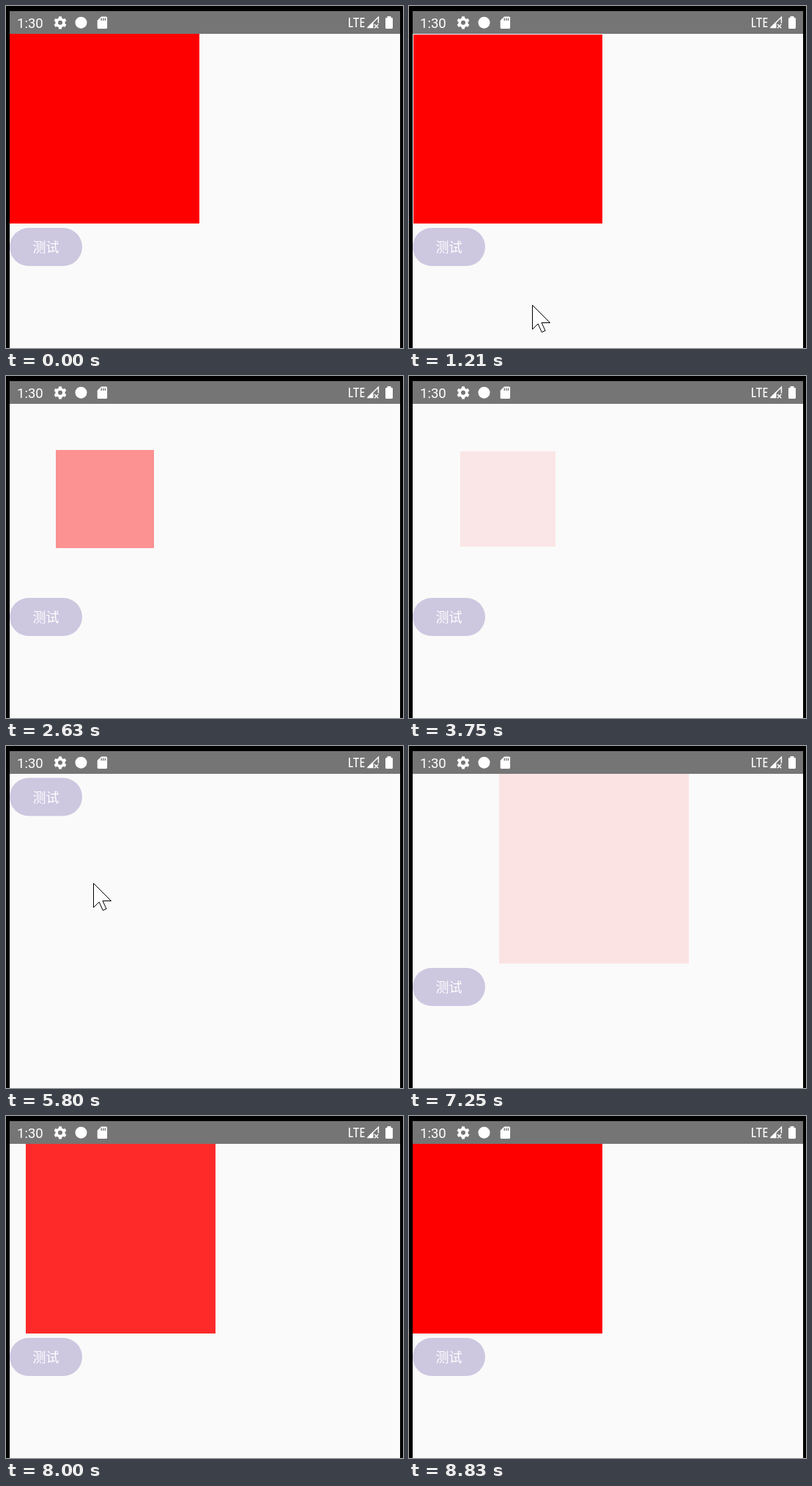
An HTML page for the animation above (9840 ms loop, 542 px wide and 467 px high).

```html
<!DOCTYPE html>
<html lang="zh-CN">
<head>
<meta charset="utf-8">
<title>Visibility animation</title>
<style>
  html, body { margin: 0; width: 100%; height: 100%; overflow: hidden; background: #000; }
  svg { display: block; width: 542px; height: 467px; }
  .clock { font: 18.5px Roboto, sans-serif; fill: #fff; }
  .label { font: 18px "Noto Sans CJK SC", "Noto Sans CJK", sans-serif; fill: #fff; text-anchor: middle; }
</style>
</head>
<body>
<svg viewBox="0 0 542 467">
  <rect width="542" height="467" fill="#000"/>
  <rect x="5" y="7" width="533" height="460" fill="#fafafa"/>
  <rect id="square" fill="#f00" shape-rendering="crispEdges"/>
  <g id="button">
    <rect x="5" y="303" width="99" height="52" rx="26" fill="#cdc7e0"/>
    <text class="label" x="54.5" y="336">测试</text>
  </g>

  <rect x="5" y="7" width="533" height="31" fill="#757575"/>
  <text class="clock" x="15" y="29.5">1:30</text>
  <g id="gear" transform="translate(74 22.8)" fill="#fff">
    <circle r="4.8" fill="none" stroke="#fff" stroke-width="3.6"/>
  </g>
  <circle cx="102.5" cy="22.7" r="8" fill="#fff"/>
  <path d="M130 14.5h6.5q1.6 0 1.6 1.6v13.3q0 1.6-1.6 1.6h-10.200q-1.600 0-1.600-1.600v-9.600z" fill="#fff"/>
  <path d="M130.300 16.500v3.500M132.900 16.500v3.500M135.500 16.500v3.500" stroke="#757575" stroke-width="1.400"/>
  <path d="M468.800 16v12.200h5M474 16.800h8M478 16.800v12.200M489.500 16.800h-5v11.400h5M484.500 22.300h4.400"
        fill="none" stroke="#fff" stroke-width="1.600"/>
  <path d="M492.500 30.300L501.500 21.300V30.300z" fill="#fff"/>
  <path d="M494 29.300L508.400 15.300V23.500M503 25l5.200 5.200M508.200 25l-5.200 5.200"
        fill="none" stroke="#fff" stroke-width="1.500"/>
  <path d="M520.500 14h5v2h1.200q1.300 0 1.300 1.300v12.200q0 1.500-1.500 1.500h-7q-1.500 0-1.500-1.500v-12.200q0-1.300 1.300-1.300h1.200z" fill="#fff"/>

  <path id="cursor" d="M.5.5V33.500L8.200 26L13.300 37.500L18 35.300L13 24.500H24.500z"
        fill="#fff" stroke="#000" stroke-width="1"/>
</svg>
<script>
const LOOP = 9840;
const SIZE = 259.4, LEFT = 5, TOP = 38;
const EXIT = 1090, GONE = 4460, COLLAPSE = 5080, ENTER = 6910;
const FADE_HOLDS = [2900, 3080, 3330, 3750];

// Pointer visits: [time, x, y]; each is visible until its hide time.
const visits = [
  { hide: 1250, stops: [[340, 56, 429], [700, 28, 305], [1040, 28, 305], [1200, 168, 408]] },
  { hide: 7100, stops: [[5800, 119, 187], [6150, 21, 24], [6320, 40, 58], [6910, 40, 58], [7060, 385, 373]] }
];

const $ = id => document.getElementById(id);
const square = $('square'), button = $('button'), cursor = $('cursor'), gear = $('gear');
const clamp = v => Math.min(1, Math.max(0, v));
const mix = (a, b, p) => a + (b - a) * p;

function setAttrs(el, attrs) {
  for (const key in attrs) el.setAttribute(key, attrs[key]);
}

for (let i = 0; i < 6; i++) {
  const tooth = document.createElementNS('http://www.w3.org/2000/svg', 'path');
  setAttrs(tooth, { d: 'M-2.500-5.500L-1.800-8.600H1.800L2.500-5.500z', transform: `rotate(${i * 60})` });
  gear.append(tooth);
}

// cubic-bezier(0.4, 0, 0.2, 1)
function ease(x) {
  let lo = 0, hi = 1;
  for (let i = 0; i < 24; i++) {
    const s = (lo + hi) / 2, r = 1 - s;
    if (1.2 * r * r * s + 0.6 * r * s * s + s * s * s < x) lo = s;
    else hi = s;
  }
  return lo * lo * (3 - 2 * lo);
}

const tween = (t, start, length) => ease(clamp((t - start) / length));

function heldTime(t) {
  return FADE_HOLDS.reduce((held, hold) => t >= hold ? hold : held, t);
}

function drawSquare(t) {
  let scale = 1, alpha = 1, shift = 0;
  if (t >= ENTER) {
    const p = tween(t, ENTER - 5, 2000);
    alpha = p;
    shift = (1 - p) * SIZE / 2;
  } else if (t >= GONE) {
    alpha = 0;
  } else if (t >= EXIT) {
    const held = heldTime(t);
    scale = mix(1, 0.5, tween(held, EXIT, 2000));
    alpha = 1 - tween(held, EXIT, 4000);
  }
  const side = SIZE * scale, inset = (SIZE - side) / 2;
  setAttrs(square, { x: LEFT + inset + shift, y: TOP + inset, width: side, height: side, opacity: alpha });
}

function drawCursor(t) {
  const visit = visits.find(v => t >= v.stops[0][0] && t < v.hide);
  cursor.style.display = visit ? '' : 'none';
  if (!visit) return;
  let [, x, y] = visit.stops[0];
  visit.stops.slice(1).forEach(([end, toX, toY], i) => {
    const start = visit.stops[i][0];
    const p = clamp((t - start) / (end - start));
    x = mix(x, toX, p);
    y = mix(y, toY, p);
  });
  setAttrs(cursor, { transform: `translate(${Math.round(x)} ${Math.round(y)})` });
}

function draw(t) {
  drawSquare(t);
  const raised = t >= COLLAPSE && t < ENTER;
  setAttrs(button, { transform: `translate(0 ${raised ? -259.5 : 0})` });
  drawCursor(t);
}

const origin = performance.now();
function tick() {
  draw((performance.now() - origin) % LOOP);
  requestAnimationFrame(tick);
}
tick();
</script>
</body>
</html>
```
